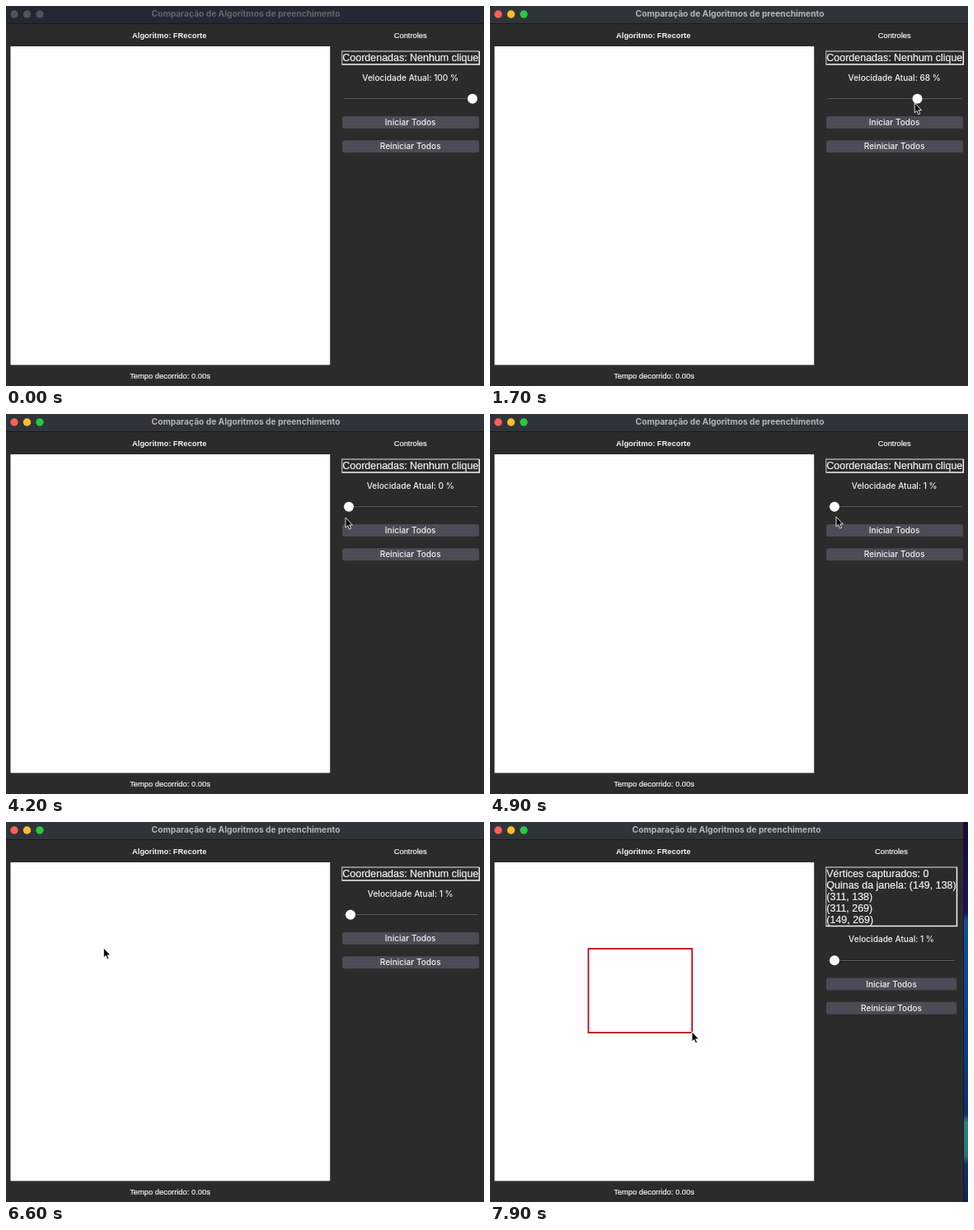
Recreate the animation shown at these times as an HTML page. Size 580 by 462 pixels, loop 8 s.

```html
<!DOCTYPE html>
<html lang="pt">
<head>
<meta charset="utf-8">
<style>
  html, body { margin: 0; width: 100%; height: 100%; overflow: hidden; background: #2b2b2b; }
  svg { display: block; }
  text { fill: #f4f4f4; white-space: pre; }
  .ui { font: 500 10.1px Inter, sans-serif; text-anchor: middle; }
  .title { font: 700 10.2px Inter, sans-serif; text-anchor: middle; }
  .label { font: 9.36px "Liberation Sans", Arial, sans-serif; text-anchor: middle; }
  .bold { font-weight: 700; }
  .info { font: 12.47px "Liberation Sans", Arial, sans-serif; }
  .label:not(.bold), .info { stroke: #f4f4f4; stroke-width: .2px; }
  .button { fill: #4c4b56; }
</style>
</head>
<body>
<svg width="580" height="462" viewBox="0 0 580 462">
  <defs>
    <linearGradient id="wall" x1="0" y1="0" x2="0" y2="1">
      <stop offset="0" stop-color="#150a3c"/>
      <stop offset=".24" stop-color="#1b1166"/>
      <stop offset=".26" stop-color="#0b4f9e"/>
      <stop offset=".77" stop-color="#0c2f78"/>
      <stop offset=".79" stop-color="#2b7f80"/>
      <stop offset=".88" stop-color="#2a7478"/>
      <stop offset=".9" stop-color="#0d2f70"/>
      <stop offset="1" stop-color="#0c2658"/>
    </linearGradient>
  </defs>
  <rect width="580" height="462" fill="url(#wall)"/>
  <rect id="win" height="462" fill="#2b2b2b"/>
  <rect id="bar" height="21"/>
  <rect id="rule" y="21" height="1" fill="#17181a"/>
  <rect id="edge" x="574" width="1" height="462" fill="#1a1a1c"/>
  <g id="lights">
    <circle cx="10" cy="10" r="4.7"/><circle cx="25.5" cy="10" r="4.7"/><circle cx="41" cy="10" r="4.7"/>
  </g>
  <text id="title" class="title" y="13.4">Comparação de Algoritmos de preenchimento</text>
  <text class="label bold" x="198.2" y="38.6">Algoritmo: FRecorte</text>
  <rect x="5.5" y="49" width="387.7" height="387.4" fill="#fefefe"/>
  <rect id="clip" x="119.4" y="154.1" width="125.8" height="102" fill="none" stroke="#b90f16" stroke-width="1.8"/>
  <text class="label" x="199" y="452.7">Tempo decorrido: 0.00s</text>

  <text id="head" class="label" y="38.6">Controles</text>
  <path id="boxDark" fill="none" stroke="#a9a9a9" stroke-width="1.3"/>
  <path id="boxLight" fill="none" stroke="#f2f2f2" stroke-width="1.5"/>
  <g id="info" class="info"></g>
  <g id="panel">
    <text id="speed" class="ui" y="90.5"></text>
    <rect id="track" x="408.5" y="111.2" height="3" rx="1.5" fill="#1b1b1b"/>
    <rect id="groove" x="409" y="112.1" height="1.2" rx=".6" fill="#5b5b5b"/>
    <circle id="knob" cy="112.7" r="6" fill="#fff"/>
    <rect class="button" x="408" y="134" height="15" rx="2.6"/>
    <text class="ui" y="145">Iniciar Todos</text>
    <rect class="button" x="408" y="163.2" height="15" rx="2.6"/>
    <text class="ui" y="174.2">Reiniciar Todos</text>
  </g>
  <path id="cursor" d="M0 0V12L2.7 9.6 4.6 14 6.6 13.1 4.7 8.9H8.4Z" fill="#050505" stroke="#f5f5f5" stroke-width=".9" stroke-linejoin="round"/>
</svg>
<script>
const LOOP = 8000, STEP = 100, LINE = 13.9;
const ENTER = 300, FOCUS = 1200, CLICK = 7000, CLICK2 = 7800;
const $ = id => document.getElementById(id);
const all = q => document.querySelectorAll(q);
const set = (el, attrs) => { for (const k in attrs) el.setAttribute(k, attrs[k]); };

// Each move: start time, end time, destination
const pointerMoves = [
  [ENTER, 1100, [563, 114]],
  [1400, 2200, [412, 126]],
  [4600, 4900, [420, 125]],
  [5500, 6000, [63, 121]],
  [6200, 6600, [118.4, 153]],
  [7000, 7600, [245, 255]]
];
const knobMoves = [[1400, 2200, [416]], [4600, 4900, [418]]];

function ease(u) {
  u = Math.min(1, Math.max(0, u));
  return u * u * (3 - 2 * u);
}

function follow(from, moves, t) {
  return moves.reduce((pos, [a, b, to]) => {
    const k = ease((t - a) / (b - a));
    return pos.map((v, i) => v + (to[i] - v) * k);
  }, from);
}

function infoLines(t) {
  if (t < CLICK) return ["Coordenadas: Nenhum clique"];
  const lines = ["Vértices capturados: 0", "Quinas da janela: (149, 138)"];
  return t < CLICK2 ? lines : [...lines, "(311, 138)", "(311, 269)", "(149, 269)"];
}

function layout(lines, narrow) {
  const right = narrow ? 566.5 : 574.3, mid = narrow ? 487 : 490.7;
  const width = narrow ? 574 : 580, bottom = 57 + LINE * lines.length;
  for (const id of ["win", "bar", "rule"]) set($(id), { width });
  $("edge").style.display = narrow ? "" : "none";
  set($("title"), { x: width / 2 + (narrow ? 0 : 1) });
  set($("head"), { x: mid });
  set($("boxDark"), { d: `M407.7 ${bottom}V55H${right}` });
  set($("boxLight"), { d: `M407.5 ${bottom}H${right}V55` });
  $("info").innerHTML = lines.map((s, i) => `<text x="408.3" y="${67.3 + LINE * i}">${s}</text>`).join("");
  set($("panel"), { transform: `translate(0 ${LINE * (lines.length - 1)})` });
  all(".ui").forEach(el => set(el, { x: mid }));
  all(".button").forEach(el => set(el, { width: right - 408.3 }));
  set($("track"), { width: right - 409.5 });
  set($("groove"), { width: right - 410.5 });
}

function paint(t) {
  const active = t >= FOCUS;
  const colors = active ? ["#fe5f57", "#febc2e", "#28c840"] : Array(3).fill("#535357");
  all("#lights circle").forEach((c, i) => set(c, { fill: colors[i] }));
  set($("bar"), { fill: active ? "#2f343a" : "#232832" });
  $("title").style.fill = active ? "#b4b6b9" : "#63666c";

  layout(infoLines(t), t >= CLICK);

  const [knob] = follow([566], knobMoves, t);
  set($("knob"), { cx: knob });
  $("speed").textContent = `Velocidade Atual: ${Math.floor((knob - 416) / 1.5)} %`;

  const [x, y] = follow([573, 172], pointerMoves, t);
  set($("cursor"), { transform: `translate(${x} ${y})` });
  $("cursor").style.display = t < ENTER ? "none" : "";
  $("clip").style.display = t < CLICK2 ? "none" : "";
}

const start = performance.now();
let last = -1;
function tick() {
  const t = Math.floor(((performance.now() - start) % LOOP) / STEP) * STEP;
  if (t !== last) paint(last = t);
  requestAnimationFrame(tick);
}
tick();
</script>
</body>
</html>
```
